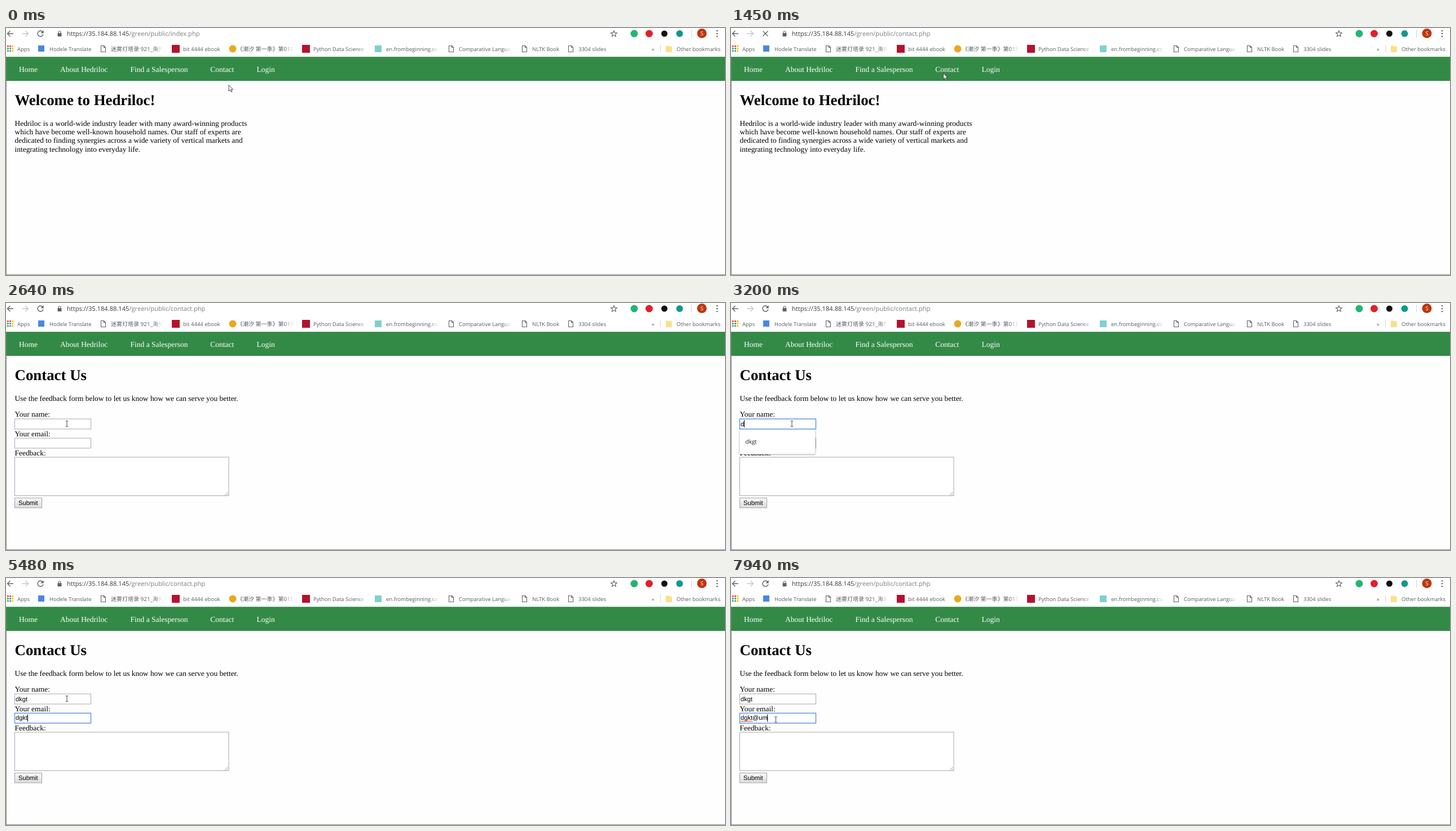
Write an HTML page that moves like this. It is 1275 by 439 pixels and loops after 8000 ms.

```html
<!DOCTYPE html>
<html lang="en">
<head>
<meta charset="utf-8">
<title>Contact form</title>
<style>
  html, body { margin: 0; width: 100%; height: 100%; overflow: hidden; background: #fff; }
  svg { display: block; width: 100vw; height: 100vh; }
  text { white-space: pre; text-rendering: geometricPrecision; }
  .ui { font: 9.5px "Open Sans", "Noto Sans CJK SC", "Noto Sans CJK", sans-serif; fill: #5a5c60; }
  .cjk { font-size: 10px; }
  .url { font-size: 11.13px; fill: #3a3a3a; }
  .list { font-size: 10px; fill: #222; }
  .nav { font: 13.5px "Liberation Serif", serif; fill: #fff; }
  .body { font: 13.43px "Liberation Serif", serif; fill: #000; }
  .head { font: bold 26.85px "Liberation Serif", serif; fill: #000; }
  .form { font: 11.15px "Liberation Sans", sans-serif; fill: #000; }
  .line { fill: none; stroke: #5f6368; stroke-width: 1.4; }
  .thin { stroke-width: 1.1; }
  .field { fill: #fff; stroke: #a9a9a9; }
  .field.on { stroke: #4a8ae0; stroke-width: 1.3; }
  .caret { stroke: #000; }
  .pointer { fill: #fff; stroke: #333; stroke-width: .9; }
</style>
</head>
<body>
<svg viewBox="0 0 1275 439" preserveAspectRatio="none">
  <defs>
    <linearGradient id="fade"><stop offset="0" stop-color="#fff" stop-opacity="0"/><stop offset="1" stop-color="#fff"/></linearGradient>
    <linearGradient id="btn" x2="0" y2="1"><stop offset="0" stop-color="#f8f8f8"/><stop offset="1" stop-color="#dcdcdc"/></linearGradient>
    <filter id="shadow" x="-10%" y="-10%" width="120%" height="130%"><feDropShadow dx="0" dy="1" stdDeviation="1" flood-opacity=".3"/></filter>
  </defs>
  <rect width="1275" height="439" fill="#fff"/>
  <rect y="51" width="1275" height="388" fill="#fefefe"/>

  <g id="toolbar">
    <path class="line" d="M13 10H3M7.5 5L2.5 10L7.5 15"/>
    <path class="line" style="stroke:#c4c6c8" d="M28.5 10H39M34.5 5L39.5 10L34.5 15"/>
    <g id="reload">
      <path class="line" d="M65 6.8A5 5 0 1 0 66 11.3"/>
      <path d="M66.7 4V9.2H61.5Z" fill="#5f6368"/>
    </g>
    <path id="stop" class="line" d="M56.5 5.5L65.5 14.5M65.5 5.5L56.5 14.5"/>
    <rect x="91.5" y="9" width="7" height="6" rx=".7" fill="#5f6368"/>
    <path class="line thin" d="M93 9V7.7A2 2 0 0 1 97 7.7V9"/>
    <text class="ui url" x="108" y="14">https://35.184.88.145<tspan id="path" fill="#7b7d80"></tspan></text>
    <path class="line thin" d="M1078 4.8L1079.5 8.4L1083.4 8.7L1080.4 11.2L1081.4 15L1078 12.9L1074.6 15L1075.6 11.2L1072.6 8.7L1076.5 8.4Z"/>
    <circle cx="1114" cy="10" r="6.5" fill="#22b573"/>
    <circle cx="1140.5" cy="10" r="6.5" fill="#e0202b"/>
    <circle cx="1167.5" cy="10" r="5.5" fill="#111"/>
    <circle cx="1194.5" cy="10" r="6" fill="#12988a"/>
    <path d="M1215.5 3V17M1160.5 30V43" stroke="#d4d4d4"/>
    <circle cx="1234" cy="9.5" r="8.5" fill="#bf360c"/>
    <text class="ui" x="1234" y="13" text-anchor="middle" style="fill:#fff">S</text>
    <path d="M1261 5v.01M1261 10v.01M1261 15v.01" stroke="#5f6368" stroke-width="2.6" stroke-linecap="round"/>
    <rect x="57" y="31" width="11" height="11" fill="#4a86e8"/>
    <rect x="294" y="30" width="14" height="14" fill="#b5122e"/>
    <circle cx="402" cy="37" r="6.5" fill="#e9a820"/>
    <rect x="525" y="30" width="14" height="14" fill="#b5122e"/>
    <rect x="654" y="31" width="12" height="12" fill="#7fd0d0"/>
    <path d="M1170 31.5h4.5l1 1H1181V43H1170Z" fill="#fbe08a"/>
  </g>

  <path d="M.5 51V439M0 438.5H1275" stroke="#858585"/>
  <rect x=".5" y="51.2" width="1274.5" height="42.8" fill="#338a46"/>
  <g id="nav"></g>
  <g id="home"></g>
  <g id="contact">
    <g id="labels"></g>
    <rect id="nameBox" class="field" x="15.5" y="206" width="135" height="18"/>
    <rect id="mailBox" class="field" x="15.5" y="240.2" width="135" height="17.8"/>
    <rect class="field" x="15.5" y="274" width="379.5" height="68.5"/>
    <path d="M388 341.5L393.5 336M391.5 341.5L393.5 339.5" stroke="#888" stroke-width=".9"/>
    <rect x="15.5" y="346.5" width="48" height="17.5" fill="url(#btn)" stroke="#a3a3a3"/>
    <text class="form" x="22" y="358.8">Submit</text>
    <text id="name" class="form" x="17" y="218.7"></text>
    <text id="mail" class="form" x="17" y="252.3"></text>
    <path id="squiggle" fill="none" stroke="#f02020"/>
    <path id="caret" class="caret"/>
    <g id="menu">
      <rect id="menuBox" x="15" y="225" rx="2.5" fill="#fff" stroke="#c8c8c8" stroke-width=".6" filter="url(#shadow)"/>
      <g id="menuItems"></g>
    </g>
  </g>

  <g id="cursor">
    <path id="arrow" class="pointer" d="M0 .5V11L2.5 8.8L4.3 12.7L6 12L4.2 8.2H7.5Z"/>
    <path id="hand" class="pointer" d="M.5 1.2Q1.3 .2 2.2 1.2V6.5Q4 5.6 4.3 7Q6 6.2 6.3 7.6Q8 7 8 8.7V12Q8 13.5 7 16.5H0Q-.5 14-3.6 10.5Q-3.5 8.8-1.7 9.3L.5 11Z"/>
    <path id="beam" class="pointer" style="fill:none" d="M.3 .5H1.7L2.5 1.2L3.3 .5H4.7M2.5 1V10M.3 10.5H1.7L2.5 9.8L3.3 10.5H4.7"/>
  </g>
</svg>
<script>
const LOOP = 8000;
const $ = id => document.getElementById(id);

function add(parent, tag, attrs, content = '') {
  const el = document.createElementNS('http://www.w3.org/2000/svg', tag);
  for (const key in attrs) el.setAttribute(key, attrs[key]);
  el.textContent = content;
  return parent.appendChild(el);
}
const write = (parent, cls, x, y, content) => add(parent, 'text', { class: cls, x, y }, content);
const show = (el, on) => el.style.display = on ? '' : 'none';

// Bookmarks: text x, label, optional clip edge, optional page icon
const bookmarks = [
  [20, 'Apps'], [77, 'Hodele Translate'],
  [186, '迷雾灯塔录 921_海外版', 277, true],
  [314, 'bit 4444 ebook'],
  [410, '《潮汐 第一季》第01集', 509],
  [545, 'Python Data Science', 639],
  [674, 'en.frombeginning.com', 767],
  [803, 'Comparative Language', 896, true],
  [933, 'NLTK Book', 0, true], [1015, '3304 slides', 0, true],
  [1145, '»'], [1189, 'Other bookmarks']
];
const bar = $('toolbar');
for (const [x, label, edge, page] of bookmarks) {
  write(bar, /[\u4e00-\u9fff]/.test(label) ? 'ui cjk' : 'ui', x, 40.5, label);
  if (edge) {
    add(bar, 'rect', { x: edge - 14, y: 28, width: 14, height: 18, fill: 'url(#fade)' });
    add(bar, 'rect', { x: edge, y: 28, width: 15, height: 18, fill: '#fff' });
  }
  if (page) add(bar, 'path', {
    class: 'line thin',
    d: `M${x - 17.5} 31.5h5l3 3v8h-8zM${x - 12.5} 31.5v3h3`
  });
}

const dotColors = ['#ea4335', '#ea4335', '#fbbc05', '#34a853', '#4285f4', '#fbbc05', '#34a853', '#34a853', '#fbbc05'];
dotColors.forEach((fill, i) => add(bar, 'rect', {
  x: 2 + i % 3 * 4.2, y: 31 + Math.floor(i / 3) * 4.2, width: 2.8, height: 2.8, fill
}));

[[23, 'Home'], [96, 'About Hedriloc'], [220.5, 'Find a Salesperson'], [362.3, 'Contact'], [444.5, 'Login']]
  .forEach(([x, label]) => write($('nav'), 'nav', x, 78, label));

write($('home'), 'head', 15.5, 136.7, 'Welcome to Hedriloc!');
[
  'Hedriloc is a world-wide industry leader with many award-winning products',
  'which have become well-known household names. Our staff of experts are',
  'dedicated to finding synergies across a wide variety of vertical markets and',
  'integrating technology into everyday life.'
].forEach((line, i) => write($('home'), 'body', 15.5, 173.5 + i * 15.4, line));

write($('labels'), 'head', 15.5, 136.7, 'Contact Us');
[
  [173.5, 'Use the feedback form below to let us know how we can serve you better.'],
  [202.3, 'Your name:'], [236.5, 'Your email:'], [270.5, 'Feedback:']
].forEach(([y, label]) => write($('labels'), 'body', 15.5, y, label));

const menuRows = ['dkgt', "<script>alert('xss');<\/script>", 'test', 'hello']
  .map((label, i) => write($('menuItems'), 'ui list', 25.5, 250 + i * 21.7, label));

let zigzag = 'M17 255.5';
for (let x = 18.5, up = true; x <= 38; x += 1.5, up = !up) zigzag += `L${x} ${up ? 253.8 : 255.5}`;
$('squiggle').setAttribute('d', zigzag);

// Each track: [start ms, value]; the last entry at or before t holds
const at = (track, t) => track.reduce((value, step) => step[0] <= t ? step : value)[1];

const cursorTrack = [
  [0, ['arrow', 395, 101]], [290, ['arrow', 391, 101]], [440, ['arrow', 376, 81]],
  [590, ['hand', 376, 79]], [1030, ['arrow', 376.5, 80]],
  [2100, ['arrow', 280, 138]], [2220, ['arrow', 197, 188]], [2370, ['arrow', 150, 195]],
  [2520, ['beam', 118, 207]], [2640, ['beam', 105.5, 209]],
  [6040, ['beam', 102, 213]], [6170, ['beam', 96, 218]],
  [6310, ['beam', 84, 237]], [6460, ['beam', 77, 246]]
];
const nameTrack = [[0, ''], [3200, 'd'], [3740, 'dk'], [3870, 'dkg'], [4010, 'dkgt']];
const mailTrack = [
  [0, ''], [5240, 'd'], [5360, 'dgk'], [5480, 'dgkt'],
  [7400, 'dgkt@'], [7660, 'dgkt@u'], [7940, 'dgkt@um']
];
const focusTrack = [[0, ''], [2900, 'name'], [4540, 'mail']];
const caretTrack = [[0, 0], [2900, 1], [4960, 0], [5240, 1], [6040, 0], [6610, 1], [7010, 0], [7400, 1]];
const menuTrack = [[0, 0], [2900, 4], [3200, 1], [4540, 0]];

function drawCaret(focus, on) {
  show($('caret'), focus && on);
  if (!focus) return;
  const field = $(focus);
  const width = field.textContent ? field.getComputedTextLength() : 0;
  const x = Math.floor(17 + width) + .5;
  $('caret').setAttribute('d', `M${x} ${focus === 'name' ? 208 : 242.5}v13`);
}

function drawMenu(rows) {
  show($('menu'), rows);
  menuRows.forEach((row, i) => show(row, i < rows));
  $('menuBox').setAttribute('width', rows > 1 ? 181 : 134.5);
  $('menuBox').setAttribute('height', 43.5 + Math.max(0, rows - 1) * 21.7);
}

function draw(t) {
  const loading = t >= 1030 && t < 1700;
  show($('stop'), loading);
  show($('reload'), !loading);
  show($('home'), t < 1700);
  show($('contact'), t >= 1700);
  $('path').textContent = `/green/public/${t < 1450 ? 'index' : 'contact'}.php`;

  const [shape, x, y] = at(cursorTrack, t);
  $('cursor').setAttribute('transform', `translate(${x} ${y})`);
  for (const id of ['arrow', 'hand', 'beam']) show($(id), id === shape);

  $('name').textContent = at(nameTrack, t);
  $('mail').textContent = at(mailTrack, t);
  const focus = at(focusTrack, t);
  $('nameBox').classList.toggle('on', focus === 'name');
  $('mailBox').classList.toggle('on', focus === 'mail');
  show($('squiggle'), t >= 6460);
  drawCaret(focus, at(caretTrack, t));
  drawMenu(at(menuTrack, t));
}

const start = performance.now();
function tick() {
  draw((performance.now() - start) % LOOP);
  requestAnimationFrame(tick);
}
tick();
</script>
</body>
</html>
```
